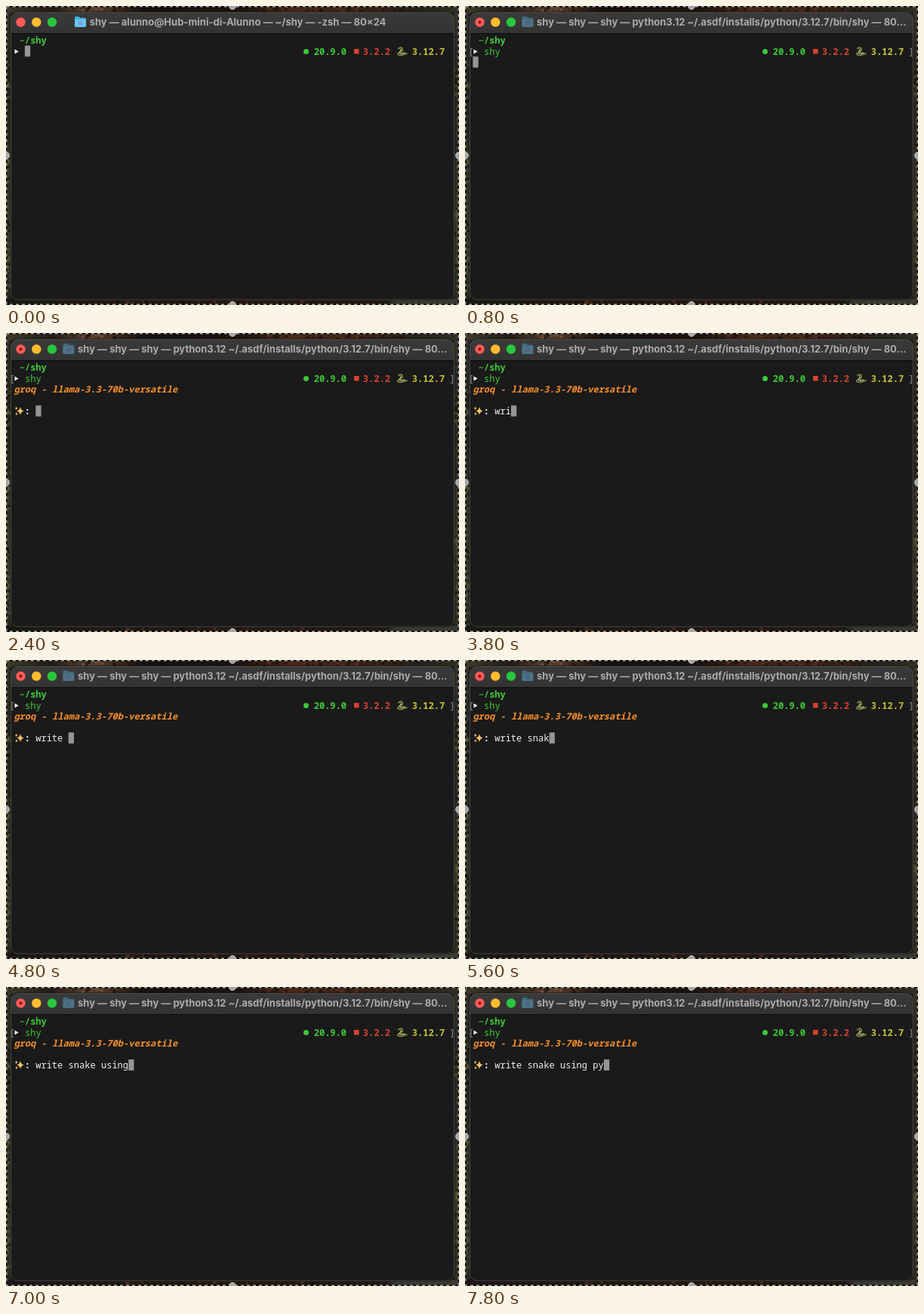
Write an HTML page that moves like this. It is 600x397 px and loops after 8 s.

```html
<!DOCTYPE html>
<html lang="en">
<head>
<meta charset="utf-8">
<title>Terminal session</title>
<style>
  html, body { margin: 0; width: 100%; height: 100%; overflow: hidden; background: #14120f; }
  svg { display: block; width: 100vw; height: 100vh; }
  text { white-space: pre; }
  .title { font: 700 13px Inter, sans-serif; fill: #adabab; }
  .mono { font: 500 12.05px "Noto Sans Mono", "DejaVu Sans Mono", monospace; fill: #f0f0f0; }
  .bold { font-weight: 700; }
  .mono.green { fill: #3fc83a; }
  .mono.red { fill: #d8432f; }
  .mono.yellow { fill: #c3c23c; }
  .mono.orange { fill: #f78f2c; font-style: italic; }
  .mono.mark { fill: #8f8f8f; font-weight: 400; }
</style>
</head>
<body>
<svg viewBox="0 0 600 397" preserveAspectRatio="none">
  <defs>
    <linearGradient id="top">
      <stop offset="0" stop-color="#3c3b2a"/>
      <stop offset=".1" stop-color="#221b15"/>
      <stop offset=".18" stop-color="#5f4334"/>
      <stop offset=".24" stop-color="#40291b"/>
      <stop offset=".3" stop-color="#16110e"/>
      <stop offset=".52" stop-color="#1d130f"/>
      <stop offset=".62" stop-color="#4b2718"/>
      <stop offset=".8" stop-color="#402418"/>
      <stop offset=".9" stop-color="#242018"/>
      <stop offset="1" stop-color="#303024"/>
    </linearGradient>
    <linearGradient id="side" x2="0" y2="1">
      <stop offset="0" stop-color="#35352a"/>
      <stop offset=".25" stop-color="#23221a"/>
      <stop offset=".5" stop-color="#2d2c20"/>
      <stop offset=".75" stop-color="#393a24"/>
      <stop offset="1" stop-color="#26261e"/>
    </linearGradient>
    <linearGradient id="bottom">
      <stop offset="0" stop-color="#1b1914"/>
      <stop offset=".3" stop-color="#22180f"/>
      <stop offset=".6" stop-color="#28170f"/>
      <stop offset=".84" stop-color="#1e1914"/>
      <stop offset=".86" stop-color="#383832"/>
      <stop offset="1" stop-color="#3a3a31"/>
    </linearGradient>
    <linearGradient id="bar" x2="0" y2="1">
      <stop offset="0" stop-color="#3b3a3a"/>
      <stop offset="1" stop-color="#343333"/>
    </linearGradient>
    <path id="star" d="M0-1Q.18-.18 1 0Q.18.18 0 1Q-.18.18-1 0Q-.18-.18 0-1Z"/>
    <circle id="handle" r="4.5"/>
    <g id="folder">
      <path d="M0 1.5Q0 0 1.5 0h4l1.8 1.8h6q1.5 0 1.5 1.5v9q0 1.5-1.5 1.5h-11.8q-1.5 0-1.5-1.5Z" fill="#46b4e6"/>
      <path d="M0 4h14.8v8.3q0 1.5-1.5 1.5h-11.8q-1.5 0-1.5-1.5Z" fill="#68c9f2"/>
      <circle cx="7.4" cy="8.5" r="3" fill="#7f9fe0"/>
    </g>
  </defs>

  <!-- Wallpaper -->
  <rect width="600" height="397" fill="#191612"/>
  <rect width="7" height="397" fill="url(#side)"/>
  <rect x="593" width="7" height="397" fill="url(#side)"/>
  <rect width="600" height="9" fill="url(#top)"/>
  <rect y="389" width="600" height="8" fill="url(#bottom)"/>
  <g id="leaves"></g>

  <!-- Window -->
  <rect x="5.5" y="7.500" width="589" height="383.500" rx="9.500" fill="#0c0c0c"/>
  <rect x="6.5" y="8.5" width="587" height="381.5" rx="9" fill="#1a1a1a"/>
  <path d="M6.5 36V17.5a9 9 0 0 1 9-9H584.5a9 9 0 0 1 9 9V36Z" fill="url(#bar)"/>
  <path d="M7 36.5H593" stroke="#0d0d0d"/>
  <rect x="6.5" y="8.5" width="587" height="381.5" rx="9" fill="none" stroke="#4a4a46"/>
  <circle cx="19.5" cy="21.5" r="6.200" fill="#fc5b57"/>
  <circle id="busyDot" cx="19.5" cy="21.5" r="2" fill="#7c1511"/>
  <circle cx="40.3" cy="21.5" r="6.200" fill="#fdbc2e"/>
  <circle cx="61" cy="21.5" r="6.200" fill="#29c73f"/>

  <g id="idleTitle">
    <use href="#folder" x="91" y="14"/>
    <text class="title" x="110.700" y="26">shy — alunno@Hub-mini-di-Alunno — ~/shy — -zsh — 80×24</text>
  </g>
  <g id="busyTitle">
    <use href="#folder" x="75.5" y="14" opacity=".42"/>
    <text class="title" x="95" y="26">shy — shy — shy — python3.12 ~/.asdf/installs/python/3.12.7/bin/shy — 80…</text>
  </g>

  <!-- Prompt -->
  <text class="mono bold green" x="17.700" y="50">~/shy</text>
  <path d="M11.5 57.4L16.700 60.4L11.5 63.4Z" fill="#f4f4f4"/>
  <circle cx="397.5" cy="60.5" r="3.5" fill="#3fc83a"/>
  <text class="mono bold green" x="407.7" y="64.5">20.9.0</text>
  <rect x="461" y="57" width="6.5" height="6.5" fill="#d8432f"/>
  <text class="mono bold red" x="472.8" y="64.5">3.2.2</text>
  <g fill="none" stroke-linecap="round" stroke-linejoin="round">
    <path d="M520 56.500q2.800-2.500 4.500-.3q1.300 2.300-1 4.300M520.500 62q-3.500 2 .2 3q4 .8 6.500-.8q2-1.500 3.500-.7" stroke="#75893f" stroke-width="2"/>
    <path d="M522.800 57.800q.5 1.500-1.300 3.200q-.8 1.700 2.500 1.900q3 .1 4-1" stroke="#c9cf94" stroke-width="1.200"/>
  </g>
  <text class="mono bold yellow" x="537.8" y="64.5">3.12.7</text>
  <g id="marks">
    <text class="mono mark" x="4.500" y="64.5">[</text>
    <text class="mono mark" x="587.5" y="64.5">]</text>
  </g>
  <text id="command" class="mono green" x="25" y="64.5"></text>

  <!-- Chat -->
  <g id="chat">
    <text class="mono bold orange" x="10.400" y="79">groq - llama-3.3-70b-versatile</text>
    <g fill="#f0c068">
      <use href="#star" transform="translate(19 103.5) scale(4.600 5.600)"/>
      <use href="#star" transform="translate(13.700 100) scale(2 2.500)"/>
      <use href="#star" transform="translate(14 107.300) scale(1.800 2.200)"/>
    </g>
    <text class="mono bold" x="24.700" y="107.7">:</text>
    <text id="question" class="mono" x="39.2" y="107.7"></text>
  </g>
  <rect id="cursor" width="7.3" height="14.6" fill="#959595"/>

  <!-- Selection -->
  <rect x=".8" y=".8" width="598.4" height="395.4" fill="none" stroke="#090909" stroke-width="1.6"/>
  <rect id="ants" x=".8" y=".8" width="598.4" height="395.4" fill="none" stroke="#aaaaa6" stroke-width="1.4" stroke-dasharray="4 4"/>
  <g fill="#a6a6a6" stroke="#c8c8c8">
    <use href="#handle" x="300" y="0"/>
    <use href="#handle" x="300" y="397"/>
    <use href="#handle" x="0" y="198.5"/>
    <use href="#handle" x="600" y="198.5"/>
  </g>
</svg>
<script>
  const LOOP = 8000, STEP = 200, CELL = 7.23;
  const ENTER_AT = 800, REPLY_AT = 1200;
  const QUESTION = "write snake using py";

  // Typing bursts: [start, end, characters before, characters after]
  const commandBursts = [[0, 600, 0, 3]];
  const questionBursts = [
    [3000, 3600, 0, 3], [3800, 4400, 3, 6],
    [4800, 6200, 6, 14], [6200, 7600, 14, 20]
  ];

  const $ = id => document.getElementById(id);
  const show = (id, visible) => $(id).style.display = visible ? "" : "none";

  function seededRandom(seed) {
    return () => (seed = seed * 16807 % 2147483647) / 2147483647;
  }

  // Scatters blurred leaf spots over one strip of the wallpaper
  function scatter(count, left, top, width, height, colors, random) {
    for (let i = 0; i < count; i++) {
      const leaf = document.createElementNS("http://www.w3.org/2000/svg", "ellipse");
      const shape = {
        cx: left + random() * width, cy: top + random() * height,
        rx: 1 + random() * 2, ry: 1 + random() * 2,
        fill: colors[Math.floor(random() * colors.length)], opacity: 0.6
      };
      for (const name in shape) leaf.setAttribute(name, shape[name]);
      $("leaves").append(leaf);
    }
  }

  function paintWallpaper() {
    const random = seededRandom(41);
    const olive = ["#5c5c30", "#3f4028", "#14130e"];
    const rust = ["#63361f", "#2a1a12", "#100d0b"];
    scatter(90, 0, 10, 7, 375, olive, random);
    scatter(80, 593, 10, 7, 375, olive, random);
    scatter(25, 90, 2, 55, 6, ["#8a6650", "#47301f", "#16100c"], random);
    scatter(60, 330, 2, 200, 6, rust, random);
    scatter(40, 120, 391, 300, 5, rust, random);
  }

  function typed(bursts, t) {
    let count = 0;
    for (const [start, end, from, to] of bursts) {
      if (t >= start) {
        const progress = Math.min(1, (t - start) / (end - start));
        count = Math.floor(from + (to - from) * progress + 1e-6);
      }
    }
    return count;
  }

  function render(time) {
    const t = Math.floor((time % LOOP) / STEP) * STEP;
    const busy = t >= ENTER_AT, ready = t >= REPLY_AT;
    const commandLength = typed(commandBursts, t);
    const questionLength = typed(questionBursts, t);

    show("idleTitle", !busy);
    show("busyTitle", busy);
    show("busyDot", busy);
    show("marks", busy);
    show("chat", ready);
    $("command").textContent = "shy".slice(0, commandLength);
    $("question").textContent = QUESTION.slice(0, questionLength);

    const [x, y] = ready ? [39.3 + questionLength * CELL, 96.2]
      : busy ? [10.4, 67.2]
      : [24.9 + commandLength * CELL, 52.6];
    $("cursor").setAttribute("x", x);
    $("cursor").setAttribute("y", y);
    $("ants").setAttribute("stroke-dashoffset", -2 * t / STEP);
  }

  paintWallpaper();
  const begin = performance.now();
  function frame() {
    render(performance.now() - begin);
    requestAnimationFrame(frame);
  }
  frame();
</script>
</body>
</html>
```
